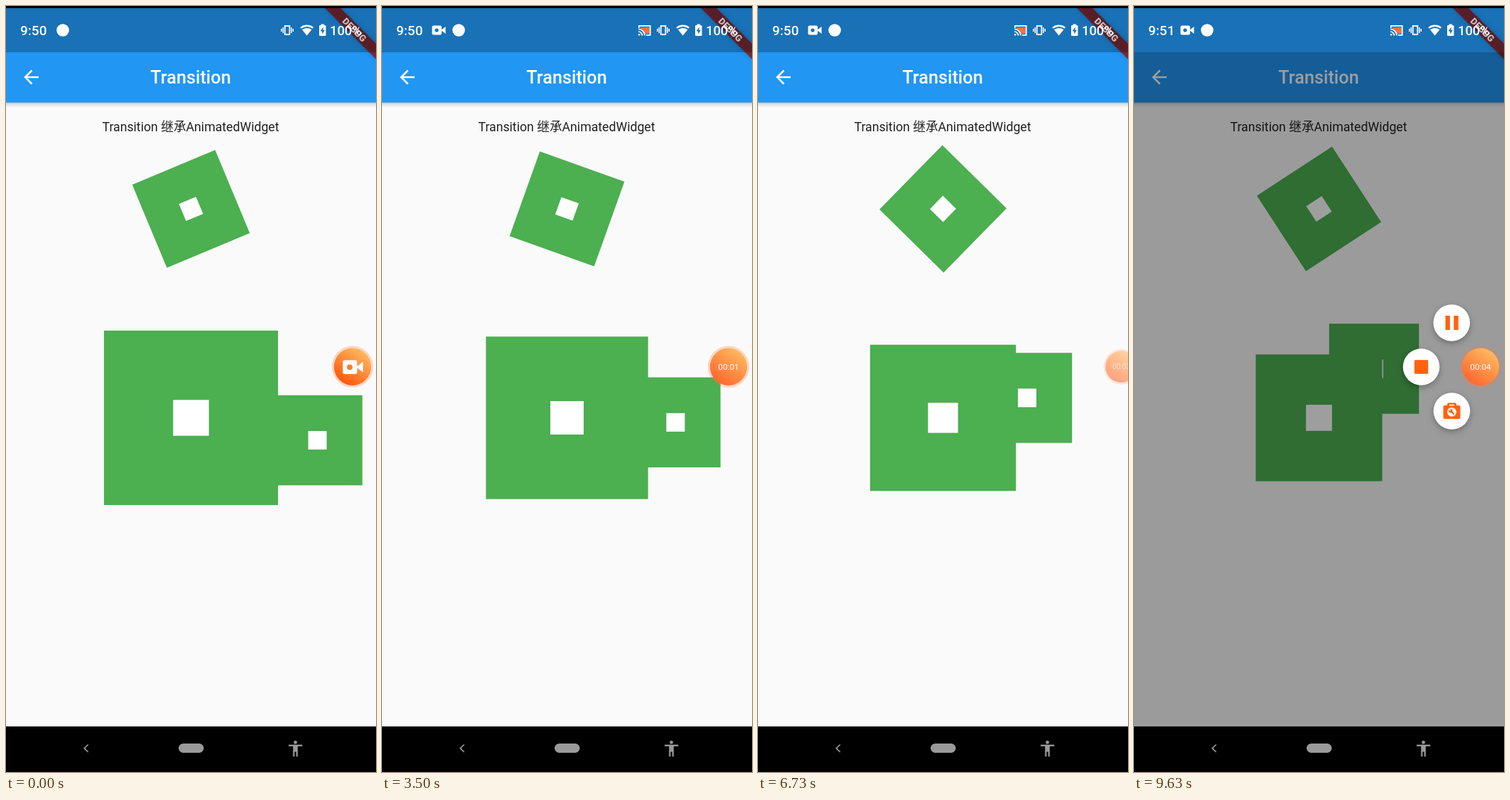
An HTML page with a canvas that plays this animation: 521 by 1076 pixels, repeating every 9730 ms.

```html
<!DOCTYPE html>
<html lang="en">
<head>
<meta charset="utf-8">
<title>Transition</title>
<style>
html, body { margin: 0; width: 100%; height: 100%; overflow: hidden; background: #000; }
canvas { display: block; width: 521px; height: 1076px; }
</style>
</head>
<body>
<canvas id="stage" width="521" height="1076"></canvas>
<script>
const ctx = document.getElementById('stage').getContext('2d');
const W = 521, LOOP = 9730, DP = 1.265, TAU = Math.PI * 2;
const FONT = 'Roboto, "Noto Sans CJK SC", "Noto Sans CJK", sans-serif';
const WHITE = '#fff', ORANGE = '#ff6210', GREY = '#9a9a9a';

// Bursts of picture steps: first step, last step, count.
const BURSTS = [
  [20, 980, 29], [1000, 1960, 29], [1980, 2940, 29], [2960, 3920, 28], [3940, 4880, 28],
  [4920, 5880, 29], [5900, 6790, 29], [6890, 7770, 29], [7870, 8750, 28], [8850, 9630, 24]
];
// Controller progress: time, turns.
const TURNS = [
  [0, -0.063], [1960, 0.439], [2940, 0.695], [3500, 0.806], [3920, 0.914], [4700, 1.107],
  [5880, 1.389], [6730, 1.6245], [6790, 1.65], [7770, 1.928], [8090, 1.999], [9630, 2.408]
];

const clamp = x => Math.max(0, Math.min(1, x));
const ease = (t, a, b) => { const x = clamp((t - a) / (b - a)); return x * x * (3 - 2 * x); };
const mix = (a, b, k) => a + (b - a) * k;

function stepTime(t) {
  const burst = BURSTS.filter(b => b[0] <= t).pop();
  if (!burst) return 0;
  const [a, b, n] = burst, gap = (b - a) / (n - 1);
  return a + gap * Math.min(n - 1, Math.floor((t - a) / gap + 0.3));
}

function progress(t) {
  let i = 1;
  while (i < TURNS.length - 1 && TURNS[i][0] < t) i++;
  const [t0, v0] = TURNS[i - 1], [t1, v1] = TURNS[i];
  const v = mix(v0, v1, clamp((t - t0) / (t1 - t0)));
  return v - Math.floor(v);
}

function rect(x, y, w, h, color) {
  ctx.fillStyle = color;
  ctx.fillRect(x, y, w, h);
}
function pill(x, y, w, h, r, color) {
  ctx.fillStyle = color;
  ctx.beginPath();
  ctx.roundRect(x, y, w, h, r);
  ctx.fill();
}
function disc(x, y, r, color) {
  ctx.fillStyle = color;
  ctx.beginPath();
  ctx.arc(x, y, r, 0, TAU);
  ctx.fill();
}
function poly(points, color) {
  ctx.fillStyle = color;
  ctx.beginPath();
  for (let i = 0; i < points.length; i += 2) ctx.lineTo(points[i], points[i + 1]);
  ctx.fill();
}
function line(points, color, width) {
  ctx.strokeStyle = color;
  ctx.lineWidth = width;
  ctx.beginPath();
  for (let i = 0; i < points.length; i += 2) ctx.lineTo(points[i], points[i + 1]);
  ctx.stroke();
}
function text(str, x, y, size, weight, color, align = 'center') {
  ctx.font = `${weight} ${size}px ${FONT}`;
  ctx.textAlign = align;
  ctx.fillStyle = color;
  ctx.fillText(str, x, y);
}
function at(x, y, scale, angle, draw) {
  ctx.save();
  ctx.translate(x, y);
  ctx.rotate(angle);
  ctx.scale(scale, scale);
  draw();
  ctx.restore();
}

function tile(x, y, scale, angle) {
  at(x, y, scale, angle, () => {
    rect(-63.25, -63.25, 126.5, 126.5, '#4caf50');
    rect(-13, -13, 26, 26, WHITE);
  });
}

function appBar() {
  const shade = ctx.createLinearGradient(0, 135, 0, 143);
  shade.addColorStop(0, 'rgba(0,0,0,.27)');
  shade.addColorStop(0.35, 'rgba(0,0,0,.1)');
  shade.addColorStop(1, 'rgba(0,0,0,0)');
  rect(0, 135, W, 8, shade);
  rect(0, 3, W, 132.5, '#2196f3');
  text('Transition', 260, 109, 25.2, 500, WHITE);
  line([46, 100, 28, 100], WHITE, 2.5);
  line([36.5, 90.5, 27, 100, 36.5, 109.5], WHITE, 2.5);
}

function debugBanner() {
  ctx.save();
  ctx.beginPath();
  ctx.rect(0, 3, W, 140);
  ctx.clip();
  ctx.translate(W, 3);
  ctx.rotate(Math.PI / 4);
  const box = [-40 * DP, 28 * DP, 80 * DP, 12 * DP];
  ctx.shadowColor = 'rgba(0,0,0,.5)';
  ctx.shadowBlur = 6;
  rect(...box, 'rgba(0,0,0,.5)');
  ctx.shadowColor = 'transparent';
  rect(...box, 'rgba(183,28,28,.627)');
  text('DEBUG', 0, 34 * DP + 4.6, 12.9, 900, WHITE);
  ctx.restore();
}

function camera(x, y, k, hole) {
  at(x, y, k, 0, () => {
    pill(-9.5, -6.5, 13.5, 13, 2, WHITE);
    poly([3, 0, 9.5, -5, 9.5, 5], WHITE);
    disc(-3, 0, 2.6, hole);
  });
}

function castIcon() {
  rect(364, 30, 13, 9, '#ff7043');
  line([361.8, 31, 361.8, 27.8, 377.7, 27.8, 377.7, 40.8, 372, 40.8], WHITE, 1.7);
  ctx.fillStyle = '#1970b6';
  ctx.beginPath();
  ctx.moveTo(361, 42);
  ctx.arc(361, 42, 10.5, -Math.PI / 2, 0);
  ctx.fill();
  ctx.strokeStyle = WHITE;
  for (const r of [9, 5.5]) {
    ctx.beginPath();
    ctx.arc(361, 41.5, r, -Math.PI / 2, 0);
    ctx.stroke();
  }
  disc(362.2, 40.3, 1.4, WHITE);
}

function fan(r, color) {
  ctx.fillStyle = color;
  ctx.beginPath();
  ctx.moveTo(423.7, 41.5);
  ctx.arc(423.7, 41.5, r, -Math.PI / 2 - 0.68, -Math.PI / 2 + 0.68);
  ctx.fill();
}

function statusBar(t) {
  rect(0, 3, W, 62, 'rgba(0,0,0,.25)');
  const recording = t >= 500, late = t >= 9000, bar = '#1970b6';
  text(late ? '9:51' : '9:50', 20, 40.5, 19, 500, WHITE, 'left');
  const shift = late ? -5 : 0;
  if (recording) {
    camera(80 + shift, 34, 1, bar);
    castIcon();
  }
  disc((recording ? 108 : 80) + shift, 34, 8.8, WHITE);

  ctx.strokeStyle = WHITE;
  ctx.lineWidth = 1.8;
  ctx.strokeRect(392.7, 28, 6.6, 12);
  line([390.2, 30, 390.2, 38], WHITE, 1.5);
  line([387.8, 32, 387.8, 36], WHITE, 1.5);
  line([401.8, 30, 401.8, 38], WHITE, 1.5);
  line([404.2, 32, 404.2, 36], WHITE, 1.5);

  fan(15, WHITE);
  fan(12.6, bar);
  fan(10.5, WHITE);

  rect(443.5, 25.5, 4.5, 3, WHITE);
  pill(441, 27, 9.5, 15, 1.3, WHITE);
  poly([446.4, 29.5, 442.8, 35.6, 445.2, 35.6, 445.2, 39.8, 448.7, 33.7, 446.4, 33.7], bar);
  text('100%', 456, 40.5, 18.3, 500, WHITE, 'left');
}

function navBar() {
  rect(0, 1012, W, 64, '#000');
  line([115.7, 1037.5, 110.2, 1042.7, 115.7, 1048], GREY, 1.7);
  pill(243, 1036, 35.5, 13, 6.5, GREY);
  disc(407.5, 1034.3, 2.4, GREY);
  rect(398, 1037.6, 19.2, 2.3, GREY);
  rect(404.2, 1038, 6.6, 9.5, GREY);
  rect(404.2, 1046, 2.2, 8.3, GREY);
  rect(408.6, 1046, 2.2, 8.3, GREY);
}

function recordButton(t) {
  const hide = ease(t, 3620, 3900) * (1 - ease(t, 8880, 9080));
  const idle = t < 550;
  at(mix(488, 511.5, hide), 506.8, mix(1, 0.85, hide), 0, () => {
    ctx.globalAlpha = mix(1, 0.6, hide);
    ctx.strokeStyle = 'rgba(255,120,60,.27)';
    ctx.lineWidth = 3.2;
    ctx.beginPath();
    ctx.arc(0, 0, 27.6, 0, TAU);
    ctx.stroke();
    const glow = ctx.createLinearGradient(-14, 20, 14, -20);
    glow.addColorStop(0, idle ? '#ff5c10' : '#ff6a30');
    glow.addColorStop(1, '#ffb55e');
    disc(0, 0, 26.2, glow);
    if (idle) {
      camera(0.5, 0.5, 1.5, '#ff7d2c');
    } else {
      const sec = Math.min(4, Math.floor((t - 550) / 1950));
      text('00:0' + sec, 0, 4.3, 11.8, 400, WHITE);
    }
  });
}

const pauseIcon = () => {
  rect(-8.8, -10, 6.4, 20, ORANGE);
  rect(3, -10, 6.4, 20, ORANGE);
};
const stopIcon = () => pill(-9.7, -9.7, 19.4, 19.4, 1.5, ORANGE);
const toolIcon = () => {
  pill(-6.5, -11.5, 13, 6, 2, ORANGE);
  pill(-12, -8, 24, 19, 2.5, ORANGE);
  rect(-3.5, -9.2, 7, 1.7, WHITE);
  disc(0, 1.3, 6.4, WHITE);
  disc(-1.6, -0.3, 2.8, ORANGE);
  line([-1, 0.3, 3.3, 4.6], ORANGE, 2.2);
  line([-4.5, -3.2, -1.8, -0.5], WHITE, 1.6);
};

function menu(t) {
  const k = ease(t, 9080, 9520);
  if (!k) return;
  [[447.3, 445, pauseIcon], [404.5, 507, stopIcon], [447.5, 569, toolIcon]].forEach(([x, y, icon]) => {
    at(mix(488, x, k), mix(507, y, k), k, 0, () => {
      ctx.globalAlpha = k;
      ctx.shadowColor = 'rgba(0,0,0,.3)';
      ctx.shadowBlur = 9;
      ctx.shadowOffsetY = 3;
      disc(0, 0, 25.8, WHITE);
      ctx.shadowColor = 'transparent';
      icon();
    });
  });
}

function draw(t) {
  const v = progress(t);
  rect(0, 0, W, 1076, '#000');
  rect(0, 65, W, 947, '#fafafa');
  appBar();
  text('Transition 继承AnimatedWidget', 260, 176, 17.7, 400, '#212121');
  tile(260.5, 285, 1, v * TAU);
  tile(260.5 + 190 * v, 432 + 190 * v, 1, 0);
  tile(260.5, 578.5, 1 + v, 0);
  debugBanner();
  statusBar(t);
  rect(0, 65, W, 947, `rgba(0,0,0,${0.38 * ease(t, 8980, 9350)})`);
  navBar();
  menu(t);
  recordButton(t);
}

const start = performance.now();
function tick() {
  draw(stepTime((performance.now() - start) % LOOP));
  requestAnimationFrame(tick);
}
tick();
</script>
</body>
</html>
```
